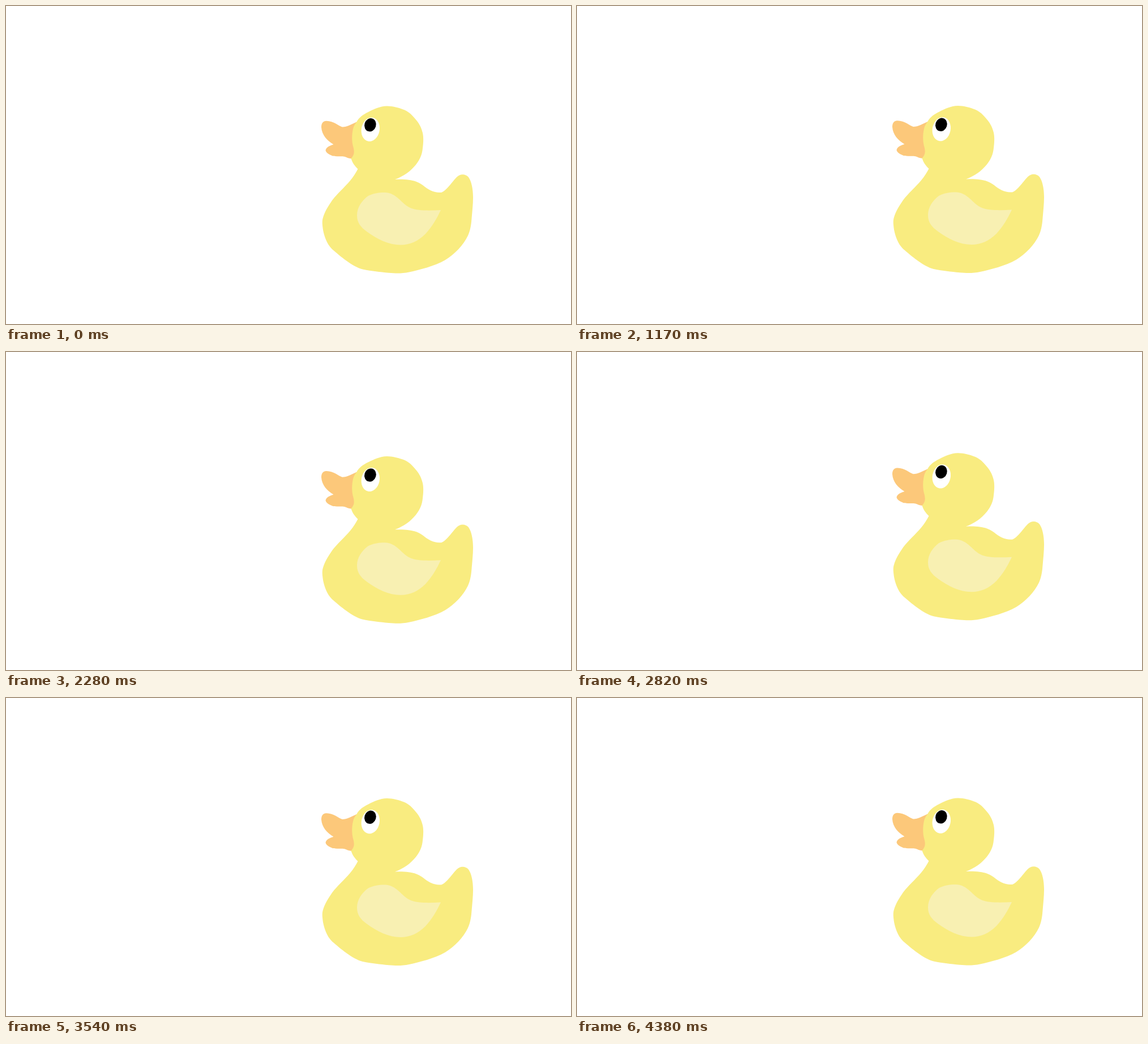
An HTML page with a canvas for the animation above (4.44 s loop, 998 px wide and 561 px high).

```html
<!DOCTYPE html>
<html lang="en">
<head>
<meta charset="utf-8">
<title>Bobbing duck</title>
<style>
  html, body { margin: 0; width: 100%; height: 100%; overflow: hidden; background: #fff; }
  canvas { display: block; }
</style>
</head>
<body>
<canvas id="stage" width="998" height="561"></canvas>
<script>
const ctx = document.getElementById('stage').getContext('2d');
const LOOP = 4440, STEP = 30;

const beak = new Path2D(`M619.5 204.5 C611 208.5 602 213.5 594 213.5
  C588 212 579 203 566 202.8 C559 203 557 208 557 214 C558 228 567 237 578.5 244.3
  C573 246.5 566 248 564.5 254.5 C565 259 571 262 577 264.5 C585 266 592 264.5 598 265.8
  C602 267 605 269.3 610 269.3 L620 262 L622 212 Z`);

const body = new Path2D(`M619 205 C624 196 630 192 640 187 C650 182 660 177 673 176.6
  C684 176.8 691 179 700 182 C710 185.5 715 190 721 197 C729 206 733 212 736 224
  C738 233 737 243 736 251 C735 262 731 271 724 280 C714 292 703 300 687 306
  C702 305.5 714 306 725 310 C738 315 742 323 754 327 C759 328.8 764 329 769 329
  C778 326 789 309 796 302 C802 296 811 295.5 817 302 C822 309 825 322 825 338
  C825 350 823.5 362 822.5 375 C821.5 389 819.5 397 816 405 C808 422 792 438 776 448
  C757 459 730 465.5 712 469.5 C700 472 690 472 676 470.8 C660 469 647 468 630 464.5
  C612 460 590 441 576 429 C566 419 562 405 560 395 C559 387 558 381 559.5 375
  C563 362 570 352 576 343 C585 331 598 320 608 308 C614 301 618 294 621.5 287.5
  C616 282 612 277 609.5 269 C616 262 615 257 614 251 C610 238 611 226 613 217
  C614 212 616 209 619 205 Z`);

const wing = new Path2D(`M669 329 C690 329 699 350 715 356.5 C727 361.5 748 361 768 360
  C761 375 752 390 741 402 C728 415 713 421.5 697 421.5 C676 421.5 655 411 638 398.5
  C626 390 620 382 620 369 C620 355 629 343 639 335.5 C648 330.5 658 329 669 329 Z`);

// Vertical drift: [time in ms, offset in px]
const drift = [
  [0, 0], [600, -5.9], [1170, -0.5], [1600, 3.8], [2200, 7.1], [2300, 7.35],
  [2470, 8.5], [2820, 1.7], [3110, -5.3], [3330, -2.5], [3540, 0.5], [3870, 4.8],
  [4400, 0], [LOOP, 0]
];

const rate = i => (drift[i + 1][1] - drift[i][1]) / (drift[i + 1][0] - drift[i][0]);

// Slope at each knot: flat at turning points, harmonic mean elsewhere
const slopes = drift.map((_, i) => {
  if (i === 0 || i === drift.length - 1) return 0;
  const a = rate(i - 1), b = rate(i);
  return a * b <= 0 ? 0 : 2 * a * b / (a + b);
});

function offsetAt(t) {
  let i = 0;
  while (i < drift.length - 2 && t >= drift[i + 1][0]) i++;
  const [t0, y0] = drift[i], [t1, y1] = drift[i + 1];
  const span = t1 - t0, u = (t - t0) / span, v = 1 - u;
  return y0 * v * v * (1 + 2 * u) + y1 * u * u * (3 - 2 * u)
    + span * u * v * (slopes[i] * v - slopes[i + 1] * u);
}

function fill(path, color) {
  ctx.fillStyle = color;
  ctx.fill(path);
}

function oval(x, y, rx, ry, tilt, color) {
  const path = new Path2D();
  path.ellipse(x, y, rx, ry, tilt, 0, Math.PI * 2);
  fill(path, color);
}

function draw(time) {
  const t = Math.floor((time % LOOP) / STEP) * STEP;
  ctx.setTransform(1, 0, 0, 1, 0, 0);
  ctx.fillStyle = '#fff';
  ctx.fillRect(0, 0, 998, 561);
  ctx.translate(0, offsetAt(t));
  fill(beak, '#fcc87a');
  fill(body, '#f9ec80');
  fill(wing, '#f8f0b2');
  oval(643.8, 217.8, 16, 21.2, 0.2, '#fff');
  oval(643.4, 209.8, 10.2, 11.8, 0.3, '#000');
}

const start = performance.now();
function tick() {
  draw(performance.now() - start);
  requestAnimationFrame(tick);
}
tick();
</script>
</body>
</html>
```
